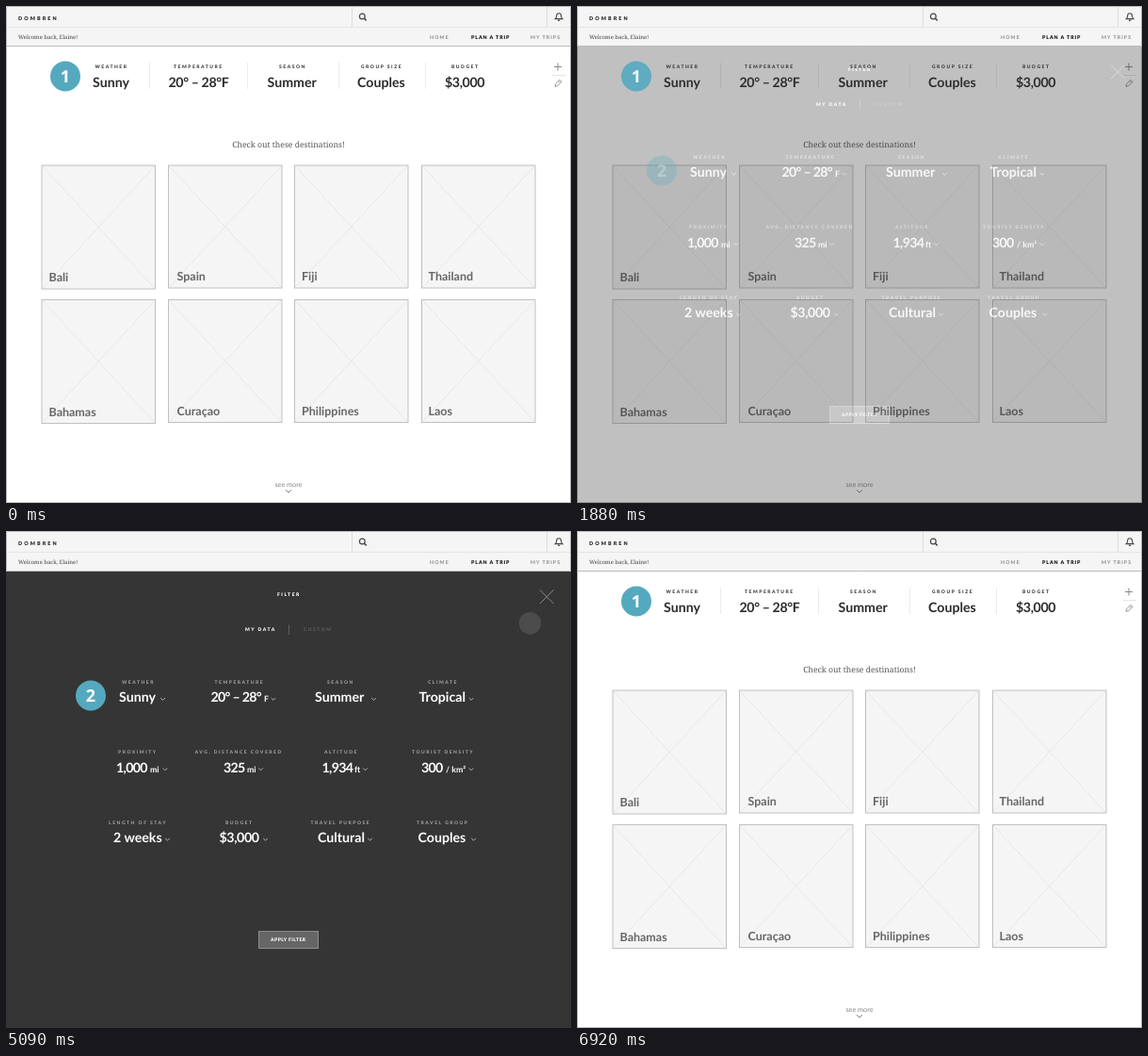
Recreate the animation shown at these times as an HTML page with a canvas. Size 600 by 527 pixels, loop 8 s.

```html
<!DOCTYPE html>
<html lang="en">
<head>
<meta charset="utf-8">
<title>Trip planner</title>
<style>
  html, body { margin: 0; width: 600px; height: 527px; overflow: hidden; background: #fff; }
  canvas { display: block; width: 600px; height: 527px; }
</style>
</head>
<body>
<canvas id="stage"></canvas>
<script>
const W = 600, H = 527, LOOP = 8000;
const SANS = 'Lato, "Open Sans", sans-serif';
const SERIF = '"Noto Serif", serif';
const TEAL = '#55a9bf', DARK = '#353535';
const dpr = window.devicePixelRatio || 1;

function layer(canvas) {
  canvas.width = W * dpr;
  canvas.height = H * dpr;
  const c = canvas.getContext('2d');
  c.scale(dpr, dpr);
  c.textRendering = 'geometricPrecision';
  return c;
}

// Drawing helpers
function text(c, str, x, y, size, color, { weight = 700, family = SANS, gap = 0, align = 'left' } = {}) {
  c.font = `${weight} ${size}px ${family}`;
  c.letterSpacing = gap + 'px';
  c.textAlign = align;
  c.fillStyle = color;
  c.fillText(str, x, y);
}

const label = (c, str, x, y, color) => text(c, str, x, y, 5, color, { weight: 900, gap: 1.5 });

// Figures are set a little tighter than words
function value(c, str, x, y, color, gap = /\d{2}/.test(str) ? -0.4 : 0) {
  text(c, str, x, y, 14.2, color, { gap });
}

function path(c, color, width, ...pts) {
  c.strokeStyle = color;
  c.lineWidth = width;
  c.beginPath();
  pts.forEach(([x, y], i) => i ? c.lineTo(x, y) : c.moveTo(x, y));
  c.stroke();
}

function box(c, x, y, w, h, fill, stroke) {
  c.fillStyle = fill;
  c.fillRect(x, y, w, h);
  c.strokeStyle = stroke;
  c.lineWidth = 1;
  c.strokeRect(x, y, w, h);
}

function disc(c, x, y, r, fill) {
  c.fillStyle = fill;
  c.beginPath();
  c.arc(x, y, r, 0, Math.PI * 2);
  c.fill();
}

function chevron(c, x, y, w, color) {
  path(c, color, 1, [x - w, y - w / 2], [x, y + w / 2], [x + w, y - w / 2]);
}

function badge(c, digit, x, y, alpha) {
  c.globalAlpha = alpha;
  disc(c, x, y, 16, TEAL);
  text(c, digit, x, y + 6.5, 18, '#fff', { weight: 600, family: '"Noto Sans", sans-serif', align: 'center' });
  c.globalAlpha = 1;
}

// Destination page
function drawPage(c) {
  c.fillStyle = '#fff';
  c.fillRect(0, 0, W, H);
  c.strokeStyle = '#bbb';
  c.lineWidth = 1;
  c.strokeRect(0.5, 0.5, W - 1, H - 1);

  [
    ['WEATHER', 94.5, 'Sunny', 92],
    ['TEMPERATURE', 178, '20° – 28°F', 172.5],
    ['SEASON', 290, 'Summer', 277.5],
    ['GROUP SIZE', 377, 'Couples', 373],
    ['BUDGET', 473, '$3,000', 466]
  ].forEach(([name, lx, val, vx]) => {
    label(c, name, lx, 65.8, '#444');
    value(c, val, vx, 85.5, '#2c2c2c');
  });
  [152.5, 256.5, 353.5, 445.5].forEach(x => path(c, '#ececec', 1, [x, 60], [x, 88]));

  path(c, '#888', 1, [582, 64.5], [590, 64.5]);
  path(c, '#888', 1, [586, 60.5], [586, 68.5]);
  path(c, '#e4e4e4', 1, [580, 73.5], [594, 73.5]);
  path(c, '#888', 0.9, [583, 85.3], [583.6, 82.7], [588, 78.3], [590, 80.3], [585.6, 84.7], [583, 85.3]);
  path(c, '#888', 0.8, [586.8, 79.5], [588.8, 81.5]);

  text(c, 'Check out these destinations!', 300, 149.7, 8.65, '#555', { weight: 400, family: SERIF, align: 'center' });

  const names = ['Bali', 'Spain', 'Fiji', 'Thailand', 'Bahamas', 'Curaçao', 'Philippines', 'Laos'];
  const cols = [[38, 45.5], [172.5, 181.5], [306.5, 314], [441.5, 448.5]];
  names.forEach((name, i) => {
    const [x, tx] = cols[i % 4], first = i % 4 === 0;
    const y = i < 4 ? 169 : 311.5, h = first ? 131 : 130, w = 120.5;
    box(c, x, y, w, h, '#f5f5f5', '#c0c0c0');
    path(c, '#e8e8e8', 1, [x + 1, y + 1], [x + w - 1, y + h - 1]);
    path(c, '#e8e8e8', 1, [x + w - 1, y + 1], [x + 1, y + h - 1]);
    text(c, name, tx, y + (first ? 123.3 : 122.3), 12.5, '#666');
  });

  text(c, 'see more', 300, 510, 7.3, '#888', { weight: 400, align: 'center' });
  chevron(c, 300, 514.5, 3, '#888');
}

// Filter panel
function drawPanel(c) {
  c.fillStyle = DARK;
  c.fillRect(0, 43, W, H - 43);

  label(c, 'FILTER', 288, 69.3, '#fff');
  label(c, 'MY DATA', 254, 106.3, '#fff');
  label(c, 'CUSTOM', 316, 106.3, '#5c5c5c');
  path(c, '#606060', 1, [300.5, 99.5], [300.5, 110]);
  path(c, '#888', 1, [567, 62.5], [581.5, 77]);
  path(c, '#888', 1, [581.5, 62.5], [567, 77]);

  // label, x, value, x, unit, x, arrow x
  const rows = [
    [
      ['WEATHER', 123, 'Sunny', 120, '', 0, 166.5],
      ['TEMPERATURE', 221.5, '20° – 28°', 217.5, 'F', 274, 284],
      ['SEASON', 341, 'Summer', 328, '', 0, 390.5],
      ['CLIMATE', 448, 'Tropical', 438.5, '', 0, 494]
    ], [
      ['PROXIMITY', 119, '1,000', 117, 'mi', 153, 169],
      ['AVG. DISTANCE COVERED', 200.5, '325', 231, 'mi', 256, 270.5],
      ['ALTITUDE', 338, '1,934', 335.5, 'ft', 370, 381.5],
      ['TOURIST DENSITY', 431, '300', 441, '/ km²', 467, 494]
    ], [
      ['LENGTH OF STAY', 109, '2 weeks', 114, '', 0, 171.5],
      ['BUDGET', 233, '$3,000', 226.5, '', 0, 275.5],
      ['TRAVEL PURPOSE', 323.5, 'Cultural', 331, '', 0, 386.5],
      ['TRAVEL GROUP', 436, 'Couples', 437.5, '', 0, 496.5]
    ]
  ];
  rows.forEach((row, i) => {
    const y = 162 + i * 74.4;
    row.forEach(([name, lx, val, vx, unit, ux, ax]) => {
      label(c, name, lx, y, '#999');
      value(c, val, vx, y + 19.4, '#fff', unit ? -0.7 : undefined);
      if (unit) text(c, unit, ux, y + 19.4, 8.8, '#fff');
      chevron(c, ax, y + 16.2, 2.3, '#b5b5b5');
    });
  });

  box(c, 268.5, 424.5, 63, 18, '#666', '#8c8c8c');
  text(c, 'APPLY FILTER', 281, 434.8, 5, '#fff', { weight: 900, gap: 0.45 });
}

// Fixed bar on top of both screens
function drawHeader(c) {
  c.fillStyle = '#f5f5f5';
  c.fillRect(0, 0, W, 43);
  path(c, '#e4e4e4', 1, [0, 22.5], [W, 22.5]);
  path(c, '#dcdcdc', 1, [367.5, 0], [367.5, 22]);
  path(c, '#dcdcdc', 1, [574.5, 0], [574.5, 22]);
  path(c, '#bbb', 1, [0.5, 42.5], [0.5, 0.5], [599.5, 0.5], [599.5, 42.5], [0, 42.5]);

  text(c, 'DOMBREN', 13, 15, 5.4, '#222', { weight: 900, gap: 2.1 });
  text(c, 'Welcome back, Elaine!', 13, 35.4, 5.9, '#444', { weight: 400, family: SERIF });
  text(c, 'HOME', 450, 35, 5.3, '#888', { gap: 1.1 });
  text(c, 'PLAN A TRIP', 494, 35, 5.3, '#111', { weight: 900, gap: 0.9 });
  text(c, 'MY TRIPS', 557, 35, 5.3, '#888', { gap: 1.05 });

  c.strokeStyle = '#444';
  c.lineWidth = 1.2;
  c.beginPath();
  c.arc(378.3, 11, 2.9, 0, Math.PI * 2);
  c.stroke();
  path(c, '#444', 1.5, [380.5, 13.2], [382.7, 15.4]);

  c.lineWidth = 1.1;
  c.beginPath();
  c.moveTo(583.3, 13.6);
  c.quadraticCurveTo(584.7, 12.4, 584.7, 10.2);
  c.bezierCurveTo(584.7, 7, 589.5, 7, 589.5, 10.2);
  c.quadraticCurveTo(589.5, 12.4, 590.9, 13.6);
  c.closePath();
  c.stroke();
  path(c, '#444', 1.3, [586, 15.3], [588.2, 15.3]);
}

// Timing
const clamp = v => Math.min(1, Math.max(0, v));
const span = (t, from, length) => clamp((t - from) / length);
const smooth = p => p * p * (3 - 2 * p);

// cubic-bezier(.4, 0, .1, 1)
function fade(p) {
  let lo = 0, hi = 1;
  for (let i = 0; i < 24; i++) {
    const s = (lo + hi) / 2, q = 1 - s;
    if (1.2 * q * q * s + 0.3 * q * s * s + s * s * s < p) lo = s; else hi = s;
  }
  return smooth(lo);
}

function drawTouch(c, t, start, [x0, y0], [x1, y1]) {
  const age = t - start;
  if (age < 0 || age >= 1020) return;
  const go = smooth(span(age, 0, 480));
  const tap = span(age, 640, 380);
  const r = 11.8 + 4.2 * smooth(tap);
  disc(c, x0 + (x1 - x0) * go, y0 + (y1 - y0) * go, r, `rgba(128,128,128,${0.3 * (1 - tap)})`);
}

function build(draw) {
  const canvas = document.createElement('canvas');
  draw(layer(canvas));
  return canvas;
}

const page = build(drawPage), panel = build(drawPanel), header = build(drawHeader);
const ctx = layer(document.getElementById('stage'));

function render() {
  const t = performance.now() % LOOP;
  const alpha = clamp(fade(span(t, 1740, 560)) - fade(span(t, 6335, 585)));
  ctx.drawImage(page, 0, 0, W, H);
  ctx.globalAlpha = alpha;
  ctx.drawImage(panel, 0, 0, W, H);
  ctx.globalAlpha = 1;
  ctx.drawImage(header, 0, 0, W, H);

  // Badges fade on their own, above the dimmed page
  badge(ctx, '1', 63, 74.5, 1 - alpha * alpha);
  badge(ctx, '2', 90, 174.5, alpha);

  drawTouch(ctx, t, 500, [553, 90], [583, 84]);
  drawTouch(ctx, t, 5090, [556.5, 97.8], [574, 71]);
  requestAnimationFrame(render);
}
render();
</script>
</body>
</html>
```
